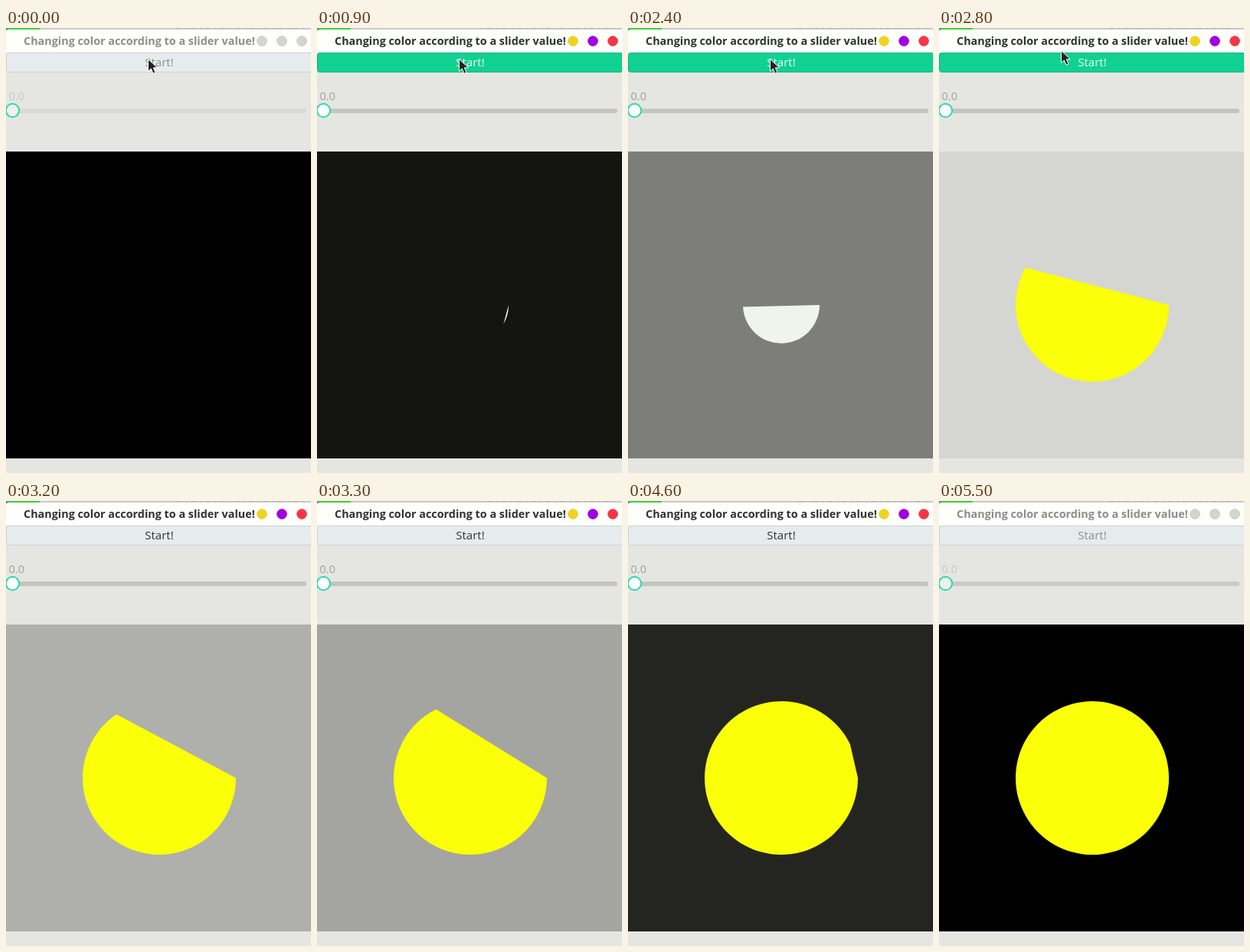
An HTML page for the animation above (5.6 s loop, 398x580 px).

```html
<!DOCTYPE html>
<html lang="en">
<head>
<meta charset="utf-8">
<title>Slider color</title>
<style>
  html, body { margin: 0; width: 100%; height: 100%; overflow: hidden; background: #e5e6e1; }
  svg { display: block; }
  text { font-family: "Open Sans", "Noto Sans", sans-serif; }
</style>
</head>
<body>
<svg width="398" height="580" viewBox="0 0 398 580">
  <rect width="398" height="580" fill="#e5e6e1"/>
  <rect width="398" height="4" fill="#c9cac5"/>
  <path d="M222 .5H392" stroke="#b2b3ae" stroke-dasharray="7 5 3 4"/>
  <rect width="44" height="2" fill="#3fd03a"/>
  <rect y="1" width="3" height="4" fill="#3d7f9c"/>
  <path d="M0 32V5Q0 2 3 2H398V32Z" fill="#fefffa"/>
  <text id="title" x="23" y="22" font-size="14.36" font-weight="700">Changing color according to a slider value!</text>
  <g id="dots" stroke-width="1">
    <circle cx="334" cy="17" r="6.3"/>
    <circle cx="360" cy="17" r="6.3"/>
    <circle cx="386" cy="17" r="6.3"/>
  </g>
  <rect id="button" x=".5" y="32.5" width="399" height="25" rx="3"/>
  <text id="start" x="200" y="50" font-size="15" text-anchor="middle">Start!</text>
  <text id="value" x="3.5" y="94" font-size="14.5">0.0</text>
  <rect id="trough" y="105" width="392" height="6" rx="3"/>
  <circle id="knob" cx="8.5" cy="107.5" r="8.7" stroke="#2adaaa" stroke-width="2"/>
  <rect id="canvas" y="161" width="398" height="400"/>
  <path id="arc"/>
  <path id="cursor" d="M.5 .5V16.5L4.3 13L7 19.3L10 18L7.3 11.8H12.5Z" fill="#222" stroke="#fff"/>
</svg>
<script>
const LOOP = 5600, STEP = 100;
const $ = id => document.getElementById(id);
const dots = [...$("dots").children];
const dotColors = ["#efd322", "#a000e2", "#f33748"];

// [time in ms, sweep in degrees]
const sweepKeys = [
  [600, 0], [900, 30], [1000, 46], [1500, 96], [1600, 96], [2200, 161],
  [2400, 177.2], [2800, 209.1], [3200, 236], [3900, 288.1], [4600, 334],
  [4700, 334], [5000, 353], [5100, 353], [5200, 360]
];

const clamp = x => Math.min(1, Math.max(0, x));
const lerp = (a, b, k) => a + (b - a) * k;
const rgb = hex => [1, 3, 5].map(i => parseInt(hex.substr(i, 2), 16));

function mix(from, to, k) {
  const a = rgb(from), b = rgb(to);
  return `rgb(${a.map((c, i) => Math.round(lerp(c, b[i], k)))})`;
}

function paint(el, fill, stroke) {
  el.setAttribute("fill", fill);
  if (stroke) el.setAttribute("stroke", stroke);
}

function sweepAt(t) {
  if (t <= sweepKeys[0][0]) return 0;
  const i = sweepKeys.findIndex(k => k[0] >= t);
  if (i < 0) return 360;
  const [t0, a0] = sweepKeys[i - 1], [t1, a1] = sweepKeys[i];
  return lerp(a0, a1, (t - t0) / (t1 - t0));
}

function drawWindow(t) {
  const blur = t < 5400 ? 1 - clamp((t - 400) / 200) : clamp((t - 5300) / 200);
  const troughBlur = t < 5400 ? blur : (t - 5400) / 100 * .3;
  const green = t < 2800 ? clamp((t - 400) / 200) : 1 - clamp((t - 2800) / 200);

  paint($("title"), mix("#2f3330", "#8c8e8a", blur));
  dots.forEach((dot, i) => paint(dot,
    mix(dotColors[i], "#d4d5cf", blur), mix(dotColors[i], "#c8c9c4", blur)));
  paint($("button"), mix("#e6ecee", "#10d191", green), mix("#cbd1d2", "#0fb47e", green));
  paint($("start"), green ? mix("#8b8e8f", "#eefcf6", green) : mix("#303433", "#8b8e8f", blur));
  paint($("value"), mix("#9fa09c", "#c6c7c3", blur));
  paint($("trough"), mix("#c4c5c1", "#d9dad6", troughBlur));
  paint($("knob"), mix("#ffffff", "#eff1ec", blur));
}

function drawArc(t) {
  const sweep = sweepAt(t), late = sweep >= 180;
  const level = Math.round((late ? 2 * (360 - sweep) : sweep) * 255 / 360);
  paint($("canvas"), `rgb(${[level - 1, level, level - 5].map(c => Math.max(0, c))})`);

  const r = late ? 100 : 50;
  const a = Math.min(sweep, 359.9) * Math.PI / 180;
  const x = 200 + r * Math.cos(a), y = 361 + r * Math.sin(a);
  $("arc").setAttribute("d", sweep
    ? `M${200 + r} 361A${r} ${r} 0 ${+late} 1 ${x} ${y}Z` : "");
  paint($("arc"), late ? "#fbff08" : "#f0f4ea");
}

function drawCursor(t) {
  const k = clamp((t - 2400) / 400);
  $("cursor").setAttribute("transform", `translate(${lerp(185, 159, k)} ${lerp(40, 29, k)})`);
  $("cursor").setAttribute("visibility", t < 2900 ? "visible" : "hidden");
}

const begin = performance.now();
function frame() {
  const t = Math.floor((performance.now() - begin) % LOOP / STEP) * STEP;
  drawWindow(t);
  drawArc(t);
  drawCursor(t);
  requestAnimationFrame(frame);
}
frame();
</script>
</body>
</html>
```
